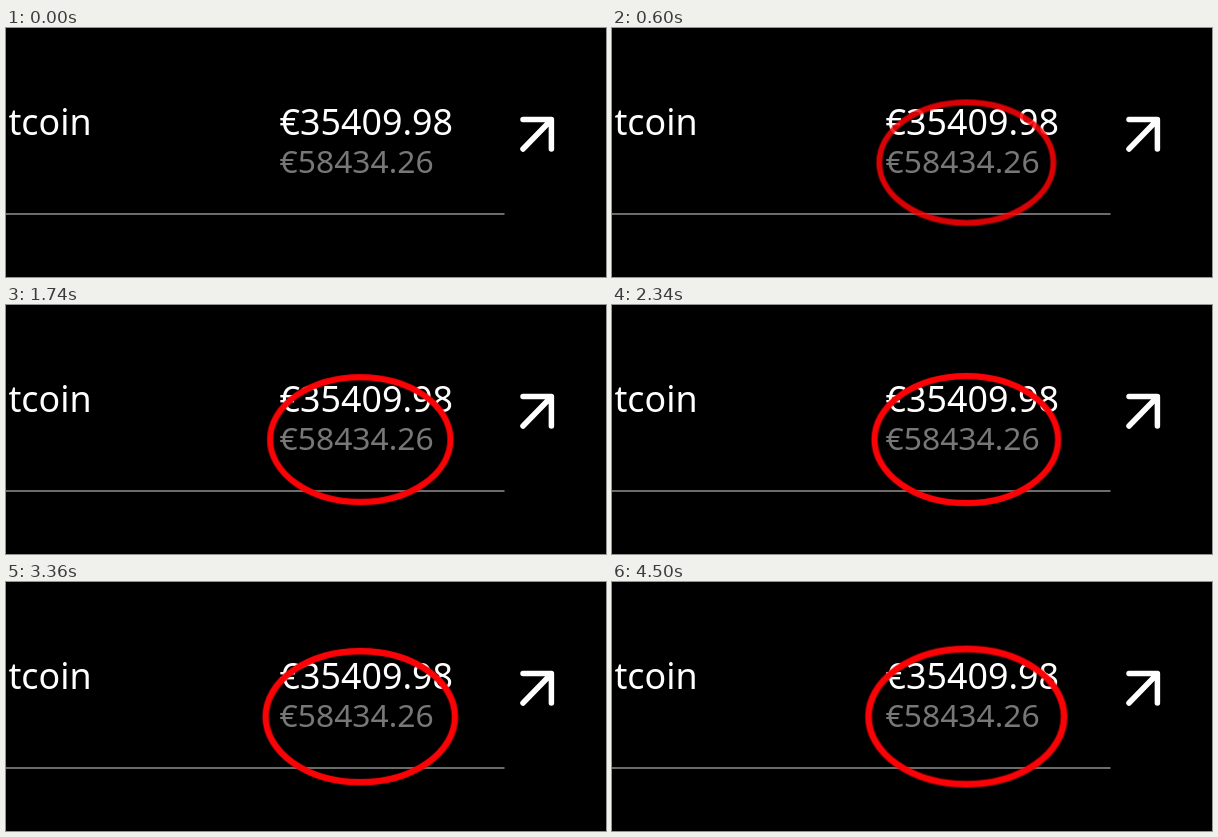
Write an HTML page that moves like this. It is 600 px wide and 249 px high and loops after 4560 ms.

```html
<!DOCTYPE html>
<html lang="en">
<head>
<meta charset="utf-8">
<title>Price alert</title>
<style>
  html, body { margin: 0; width: 100%; height: 100%; overflow: hidden; background: #000; }
  svg { display: block; width: 600px; height: 249px; }
  text { font-family: "Noto Sans", "Open Sans", sans-serif; font-weight: 500; font-size: 35.8px; fill: #fff; }
  .old { font-size: 31.8px; fill: #777; }
  .rule { stroke: #6c6c6c; stroke-width: 2; }
  .arrow { fill: none; stroke: #fff; stroke-width: 5.5; stroke-linecap: round; stroke-linejoin: round; }
  #ring { fill: none; stroke: #fb0306; stroke-width: 5.8; opacity: 0; }
</style>
</head>
<body>
<svg viewBox="0 0 600 249">
  <text x="85.5" y="106.8" text-anchor="end">Bitcoin</text>
  <text x="273.6" y="107">€35409.98</text>
  <text class="old" x="273.6" y="145">€58434.26</text>
  <path class="rule" d="M0 186H498.5"/>
  <path class="arrow" d="M517 121L545.2 92M517 91.5H545.4V121"/>
  <g transform="translate(354.3 134.6)">
    <ellipse id="ring" rx="85.4" ry="59.1"/>
  </g>
</svg>
<script>
  const LOOP = 4560, STEP = 60, FADE = 690;
  const ring = document.getElementById("ring");
  const timing = { duration: LOOP, iterations: Infinity, easing: `steps(${LOOP / STEP}, end)` };

  ring.animate({ transform: ["scale(1)", "scale(1.147)"] }, timing);
  ring.animate([
    { opacity: 0 },
    { opacity: 1, offset: FADE / LOOP },
    { opacity: 1 }
  ], timing);
</script>
</body>
</html>
```
